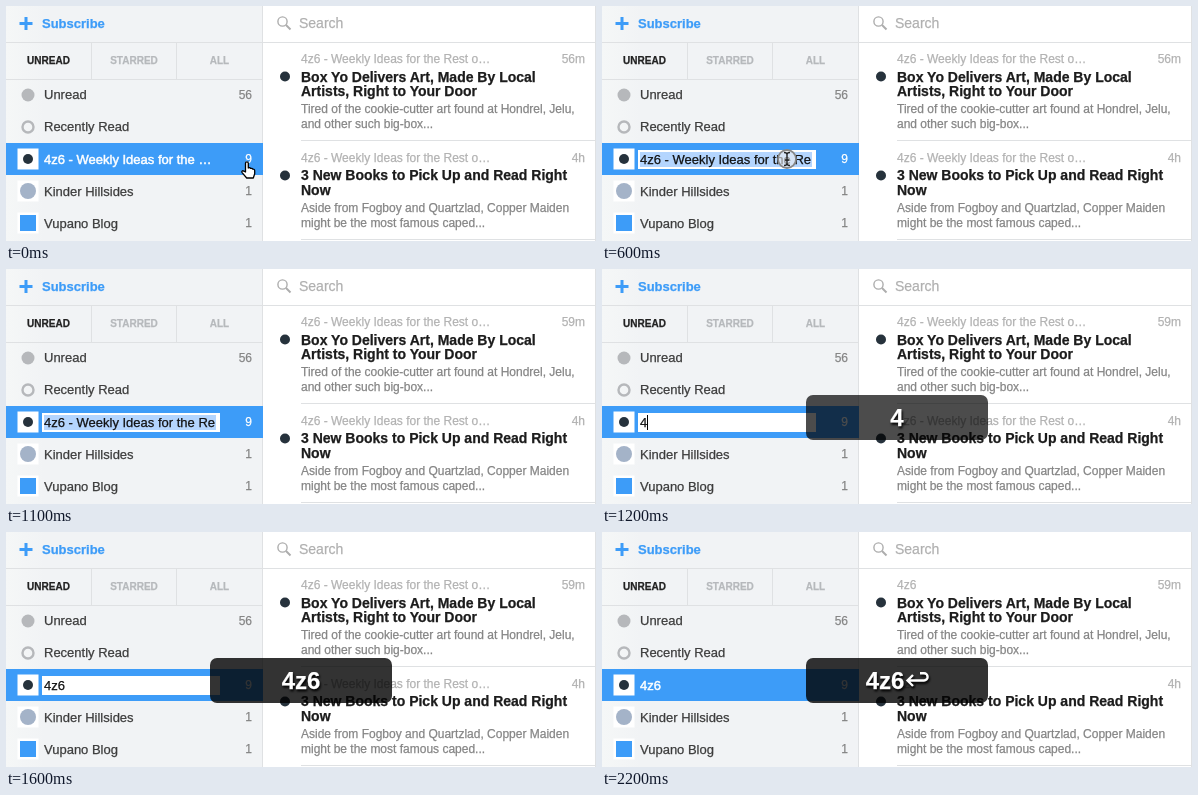
These frames come from a looping animation (590 by 235 pixels, 2.4 s). An HTML page:

```html
<!DOCTYPE html>
<html lang="en">
<meta charset="utf-8">
<title>Renaming a feed</title>
<style>
html, body { margin: 0; width: 100%; height: 100%; overflow: hidden; background: #fff; }
svg { display: block; font: 13px "Liberation Sans", Arial, sans-serif; }
text { color: #3c3c3c; fill: currentColor; stroke: currentColor; stroke-width: .25px; white-space: pre; }
.blue { color: #3d9cf8; fill: #3d9cf8; }
.tab { font: bold 10px "Liberation Sans", sans-serif; text-anchor: middle; }
.tab text { color: #b6b9bc; }
.tab .active { color: #222; }
.count, .age { font-size: 12px; text-anchor: end; }
.count { color: #858585; }
.meta, .age { font-size: 12px; color: #b2b2b2; }
.title { font-size: 14px; font-weight: bold; color: #1c1c1c; }
.body { font-size: 12px; color: #858585; }
.white { color: #fff; fill: #fff; }
.heavy { stroke-width: .5px; }
.mark { fill: #26323c; }
.rule { stroke: #dfe1e3; fill: none; }
#keys { font-size: 24px; font-weight: bold; text-anchor: middle; }
.shadow { filter: drop-shadow(1px 2px 1px #000); }
</style>
<svg width="590" height="235" viewBox="0 0 590 235">
  <!-- sidebar -->
  <linearGradient id="edge">
    <stop stop-color="#f5f7f7"/>
    <stop offset=".15" stop-color="#f1f3f5"/>
  </linearGradient>
  <rect width="256" height="235" fill="url(#edge)"/>
  <path class="rule" d="M0 36.5H590M0 73.5H256M85.5 37V73M170.5 37V73M256.5 0V235M589.5 0V235M295 134.5H589M295 233.5H589"/>
  <path class="blue" d="M18.5 11h3v5h5v3h-5v5h-3v-5h-5v-3h5z"/>
  <text class="blue" x="36" y="22" font-weight="bold">Subscribe</text>
  <g class="tab">
    <text class="active" x="42.5" y="58">UNREAD</text>
    <text x="128" y="58">STARRED</text>
    <text x="213.5" y="58">ALL</text>
  </g>
  <rect class="blue" y="137" width="257" height="32"/>
  <circle cx="22" cy="89" r="6.5" fill="#b6b8bb"/>
  <circle cx="22" cy="121" r="5.5" fill="none" stroke="#b6b8bb" stroke-width="2.4"/>
  <path class="white" d="M11.5 142.5h21v21h-21zM11.5 174.5h21v21h-21zM11.5 206.5h21v21h-21z"/>
  <circle class="mark" cx="22" cy="153" r="5"/>
  <circle cx="22" cy="185" r="8" fill="#a4b3c8"/>
  <rect class="blue" x="14" y="209" width="16" height="16"/>
  <text x="38" y="93">Unread</text>
  <text x="38" y="125">Recently Read</text>
  <text id="label" class="white heavy" x="38" y="158"></text>
  <text x="38" y="190">Kinder Hillsides</text>
  <text x="38" y="222">Vupano Blog</text>
  <text class="count" x="246" y="93">56</text>
  <text class="count white" x="246" y="157">9</text>
  <text class="count" x="246" y="189">1</text>
  <text class="count" x="246" y="221">1</text>

  <!-- articles -->
  <g fill="none" stroke="#adadad" stroke-width="1.4">
    <circle cx="276.5" cy="15.5" r="4.6"/>
    <path d="M280 19l4.5 4.5" stroke-width="2"/>
  </g>
  <text x="293" y="22" font-size="14" style="color:#b0b0b0">Search</text>
  <g>
    <circle class="mark" cx="279" cy="70.5" r="5"/>
    <text class="meta" x="295" y="57"></text>
    <text id="age" class="age" x="579" y="57"></text>
    <text class="title" x="295" y="76">Box Yo Delivers Art, Made By Local</text>
    <text class="title" x="295" y="90">Artists, Right to Your Door</text>
    <text class="body" x="295" y="107">Tired of the cookie-cutter art found at Hondrel, Jelu,</text>
    <text class="body" x="295" y="122">and other such big-box...</text>
  </g>
  <g transform="translate(0 99)">
    <circle class="mark" cx="279" cy="70.5" r="5"/>
    <text class="meta" x="295" y="57"></text>
    <text class="age" x="579" y="57">4h</text>
    <text class="title" x="295" y="75">3 New Books to Pick Up and Read Right</text>
    <text class="title" x="295" y="90">Now</text>
    <text class="body" x="295" y="107">Aside from Fogboy and Quartzlad, Copper Maiden</text>
    <text class="body" x="295" y="122">might be the most famous caped...</text>
  </g>

  <!-- rename field -->
  <g id="field">
    <rect class="white" x="36" y="144" width="178" height="19"/>
    <rect id="selection" x="38" y="146" height="15" fill="#b4d5fe"/>
    <text id="value" x="38" y="158" style="color:#111"></text>
    <rect id="caret" y="146" width="1" height="15" fill="#000"/>
  </g>

  <!-- pointer -->
  <circle id="ring" cx="185" cy="153" r="9" fill="#eee" fill-opacity=".6" stroke="#888" stroke-width="1.8"/>
  <path id="hand" fill="#fff" stroke="#000" stroke-width="1.3" stroke-linejoin="round" d="M5 11V2.2a1.4 1.4 0 0 1 2.8 0V7l1-.3a1.2 1.2 0 0 1 1.3 .7h1a1.2 1.2 0 0 1 1.2.8c1.2-.2 1.9.4 1.9 1.6v3l-1.4 4.2H6.2L1.6 11.6c-.9-1.4.6-2.4 1.8-1.4z"/>
  <path id="beam" fill="none" stroke="#222" stroke-width="1.4" d="M182 146.5q3 0 3 2q0-2 3-2M185 148V158M182 159.5q3 0 3-2q0 2 3 2M183 154h4"/>

  <!-- keystroke display -->
  <g id="overlay">
    <rect id="plate" x="204" y="126" width="182" height="45" rx="7"/>
    <g class="shadow">
      <text id="keys" class="white" y="157"></text>
      <path id="enter" fill="none" stroke="#fff" stroke-width="2.4" d="M311 143l-5.5 5.5l5.5 5.5M306 148.5H322a3.6 3.6 0 0 0 0-7.2H318"/>
    </g>
  </g>
</svg>
<script>
const $ = id => document.getElementById(id);
const show = (id, on) => $(id).style.display = on ? "" : "none";
const write = (el, s) => { if (el.textContent !== s) el.textContent = s; };

const LOOP = 2400, STEP = 100;
const NAME = "4z6", FULL = NAME + " - Weekly Ideas for the Re";
const metas = document.querySelectorAll(".meta");

function draw(now) {
  const t = Math.floor(now % LOOP / STEP) * STEP;
  const within = (from, to) => t >= from && t < to;
  const renamed = t >= 1800, typing = t >= 1200;
  const typed = NAME.slice(0, Math.max(0, (t - 1100) / STEP));

  write($("label"), renamed ? NAME : FULL.slice(0, -2) + "…");
  metas.forEach(m => write(m, renamed ? NAME : FULL + "st o…"));
  write($("age"), t < 700 ? "56m" : "59m");

  show("field", within(600, 1800));
  write($("value"), typing ? typed : FULL);
  const width = $("value").getComputedTextLength();
  show("selection", !typing);
  $("selection").setAttribute("width", width + 1);
  show("caret", within(1200, 1600));
  $("caret").setAttribute("x", Math.round(38 + width));

  const p = Math.min(1, t / 300), ease = p * p * (3 - 2 * p);
  show("hand", t < 600);
  $("hand").setAttribute("transform", `translate(${234.5 - 56 * ease} ${155 - 2.5 * ease})`);
  show("beam", within(600, 1000));
  show("ring", within(500, 800));
  $("ring").style.opacity = t < 700 ? 1 : .4;

  show("overlay", typing);
  $("plate").style.opacity = t < 1300 ? .7 : .8;
  write($("keys"), typed);
  const entered = t >= 1700;
  $("keys").setAttribute("x", entered ? 283 : 295);
  show("enter", entered);
}

(function tick() {
  draw(performance.now());
  requestAnimationFrame(tick);
})();
</script>
</html>
```
